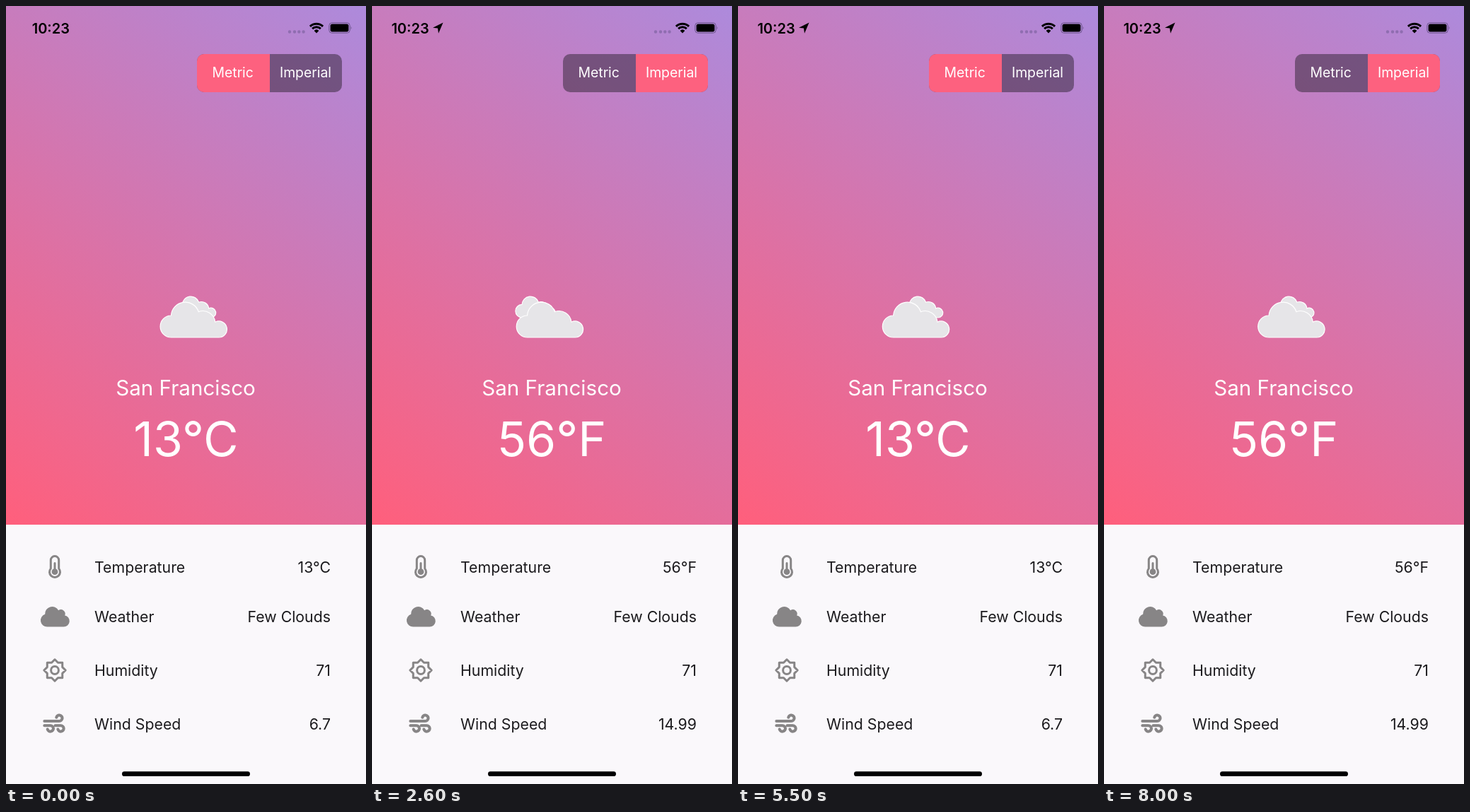
An HTML page that plays this animation: 509x1101 px, repeating every 8.1 s.

```html
<!DOCTYPE html>
<html lang="en">
<head>
<meta charset="utf-8">
<title>Weather</title>
<style>
  html, body { margin: 0; height: 100%; overflow: hidden; background: #faf8fb; }
  svg { display: block; width: 509px; height: 1101px; font-family: Inter, sans-serif; }
  .mid { text-anchor: middle; }
  .end { text-anchor: end; }
  .light { fill: #fff; }
  .rows { font-size: 21.3px; fill: #1b1a1d; }
  .line { fill: none; stroke: #878586; stroke-width: 3; stroke-linejoin: round; stroke-linecap: round; }
  .cloud { fill: #e6e5e8; stroke: #fff; stroke-width: 1.2; vector-effect: non-scaling-stroke; }
</style>
</head>
<body>
<svg viewBox="0 0 509 1101">
  <defs>
    <linearGradient id="sky" gradientUnits="userSpaceOnUse" x1="0" y1="734" x2="509" y2="0">
      <stop offset="0" stop-color="#ff5f7c"/>
      <stop offset="1" stop-color="#ad8adc"/>
    </linearGradient>
    <clipPath id="pill"><rect x="270" y="68" width="205" height="54" rx="10"/></clipPath>
    <path id="cloud" class="cloud" d="M15.5 50.5A15.5 15.5 0 0 1 15.1 19.5A20 20 0 0 1 54 14.2A17.5 17.5 0 0 1 77.5 28.7A11.5 11.5 0 1 1 82.7 50.5Z"/>
  </defs>
  <rect width="509" height="1101" fill="#faf8fb"/>
  <rect width="509" height="734" fill="url(#sky)"/>

  <!-- Status bar -->
  <text id="clock" class="mid" y="38.5" font-size="20" font-weight="600">10:23</text>
  <path id="arrow" d="M100.5 23.5L86 30.8L93 31.4L94 38.8Z"/>
  <path d="M401 36.5h.01M408 36.5h.01M414.3 36.5h.01M420.6 36.5h.01" stroke="#8f6db0" stroke-width="4.4" stroke-linecap="round"/>
  <g fill="none" stroke="#000" stroke-width="3">
    <path d="M429.9 28.8A13.3 13.3 0 0 1 448.1 28.8M433.1 32.2A8.6 8.6 0 0 1 444.9 32.2"/>
    <path d="M435.6 34.9A5 5 0 0 1 442.4 34.9L439 38.6Z" fill="#000" stroke="none"/>
  </g>
  <rect x="456.8" y="23.8" width="29.4" height="14.4" rx="4" fill="none" stroke="#6c558b"/>
  <rect x="458.6" y="25.6" width="25.8" height="10.8" rx="2.6"/>
  <path d="M487.7 28.6q1.8 2.4 0 4.8z" fill="#6c558b"/>

  <!-- Unit switch -->
  <g clip-path="url(#pill)">
    <rect x="270" y="68" width="205" height="54" fill="#2e2332" opacity=".5"/>
    <rect id="active" y="68" height="54" fill="#fd617f"/>
  </g>
  <g class="mid light" font-size="19.4">
    <text x="320.7" y="101.3">Metric</text>
    <text x="423.5" y="101.3">Imperial</text>
  </g>

  <use id="back" href="#cloud"/>
  <use id="front" href="#cloud"/>
  <text class="mid light" x="254" y="551" font-size="29.6">San Francisco</text>
  <text id="degrees" class="mid light" x="254.5" y="637" font-size="68"></text>

  <!-- Details -->
  <g class="rows">
    <text x="125" y="801.5">Temperature</text>
    <text x="125" y="872">Weather</text>
    <text x="125" y="948">Humidity</text>
    <text x="125" y="1024">Wind Speed</text>
    <g class="end">
      <text id="temp" x="459" y="801.5"></text>
      <text x="459" y="872">Few Clouds</text>
      <text x="459" y="948">71</text>
      <text id="wind" x="459" y="1024"></text>
    </g>
  </g>
  <path class="line" d="M63.3 796.1V784.3a5.7 5.7 0 0 1 11.4 0V796.1A7.5 7.5 0 1 1 63.3 796.1ZM69 788.5V800"/>
  <circle cx="69" cy="800.7" r="4.4" fill="#878586"/>
  <path transform="translate(49 848) scale(.0637)" fill="#878586" d="M144 480A144 144 0 0 1 96.2 200A160 160 0 0 1 394.7 112A96 96 0 0 1 537.6 226.6A128 128 0 0 1 512 480Z"/>
  <polygon id="sun" class="line"/>
  <circle class="line" cx="69" cy="940" r="5.4"/>
  <path class="line" transform="translate(52.3 999.4) scale(.0655)" style="stroke-width:62" d="M31 192H352A64 64 0 1 0 290 112M31 288H160A64 64 0 1 1 98 368M264 288H384A64 64 0 1 1 322 368"/>
  <rect x="164" y="1083.3" width="181" height="6.8" rx="3.4"/>
</svg>
<script>
const LOOP = 8100, STEP = 100;
const el = id => document.getElementById(id);

// Position on a polyline of [time, value] points.
function along(points, t) {
  const i = Math.max(1, points.findIndex(p => p[0] >= t));
  const [t0, v0] = points[i - 1], [t1, v1] = points[i];
  return v0 + (v1 - v0) * (t - t0) / (t1 - t0);
}

const frontX = [[0, 218.3], [4050, 196.7], [8100, 218.5]];
const backX = [[0, 240.2], [3040, 196.7], [6980, 255.2], [8100, 239]];
const switchTimes = [800, 4000, 6100];
const loadTimes = [1700, 4800, 7000];
const isImperial = (times, t) => times.filter(x => t >= x).length % 2 === 1;

el("sun").setAttribute("points", Array.from({ length: 16 }, (_, i) => {
  const r = i % 2 ? 11.6 : 15.2, a = i * Math.PI / 8;
  return [69 + r * Math.cos(a), 940 + r * Math.sin(a)];
}).join(" "));

function draw(t) {
  const located = t >= switchTimes[0];
  el("clock").setAttribute("x", located ? 54 : 63.3);
  el("arrow").style.display = located ? "" : "none";

  const right = isImperial(switchTimes, t);
  el("active").setAttribute("x", right ? 373 : 270);
  el("active").setAttribute("width", right ? 102 : 103);

  const imperial = isImperial(loadTimes, t);
  el("degrees").textContent = el("temp").textContent = imperial ? "56°F" : "13°C";
  el("wind").textContent = imperial ? "14.99" : "6.7";

  el("front").setAttribute("transform", `translate(${along(frontX, t)} 418.5)`);
  el("back").setAttribute("transform", `translate(${along(backX, t)} 410.7) scale(.6)`);
}

function tick() {
  const t = performance.now() % LOOP;
  draw(Math.floor(t / STEP) * STEP);
  requestAnimationFrame(tick);
}
tick();
</script>
</body>
</html>
```
